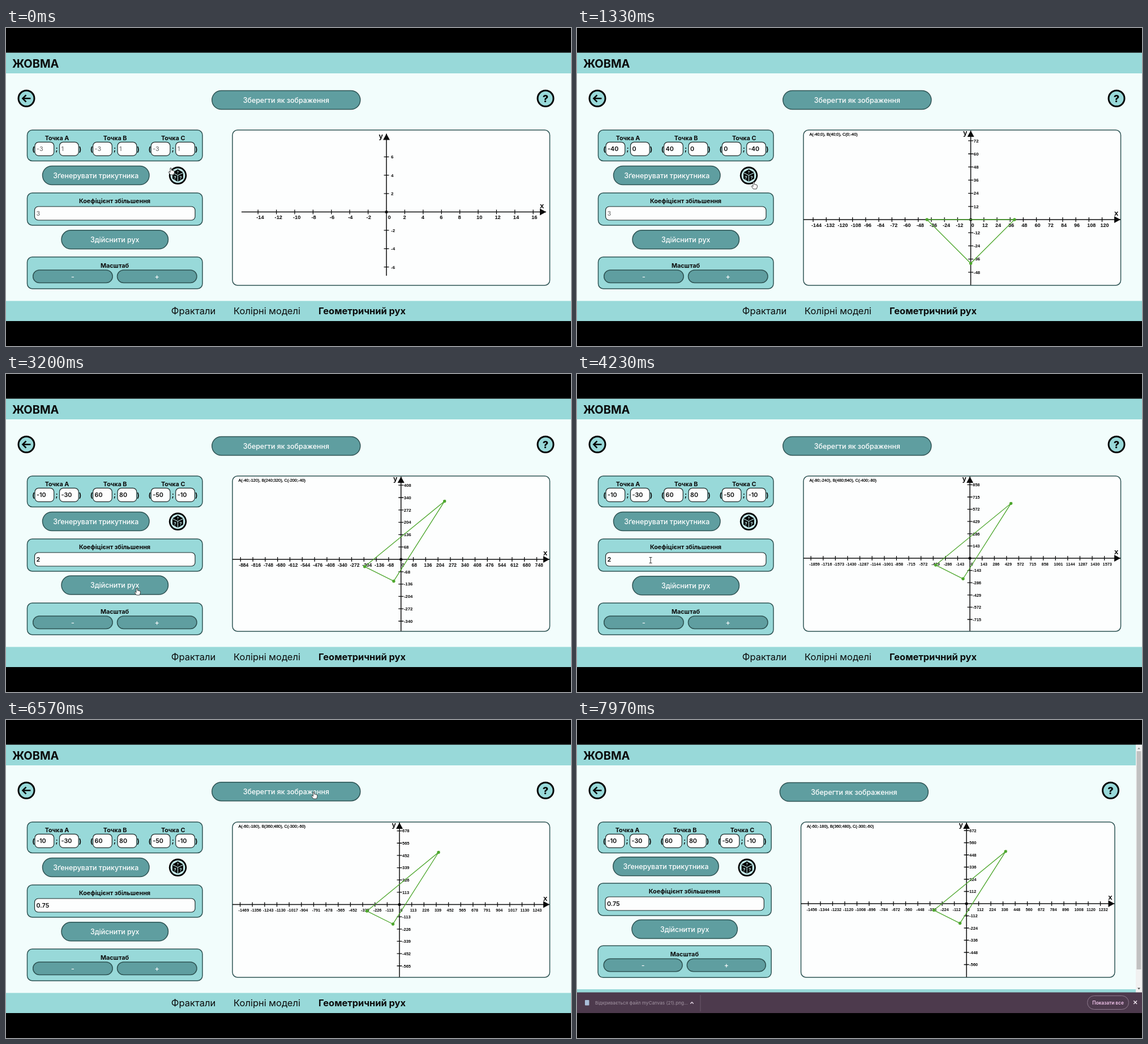
Animation of 998x561 px, one loop 8 s. Source, as an HTML page with a canvas:

```html
<!DOCTYPE html>
<html lang="uk">
<head>
<meta charset="utf-8">
<title>Геометричний рух</title>
<style>
html, body { margin: 0; width: 100%; height: 100%; overflow: hidden; background: #000; }
canvas { display: block; }
</style>
</head>
<body>
<canvas id="stage" width="998" height="561"></canvas>
<script>
const ctx = document.getElementById('stage').getContext('2d');
const LOOP = 8000, BAR_AT = 6680;
const TEAL = '#98d9d9', BUTTON = '#5f9ea0', EDGE = '#2f5454', INK = '#0b0b0b', GREEN = '#4ea72e';
const UI = 'Inter, "Open Sans", sans-serif';
const PLOT = '"Liberation Sans", Arial, sans-serif';

// Plot states: start time, origin, label step, pixels per step, points, label sizes
const first = [-40, 0, 40, 0, 0, -40];
const second = [-10, -30, 60, 80, -50, -10];
const times = k => second.map(v => v * k);
const plots = [
  { t: 0, o: [672, 324.5], step: 2, px: 32.4, size: 9.3, ySize: 8 },
  { t: 500, o: [695.5, 338], step: 12, px: 23.2, pts: first, base: first, size: 9, ySize: 8 },
  { t: 1640, o: [699.5, 328.5], step: 16, px: 21.85, pts: second, base: second, size: 9, ySize: 8 },
  { t: 2920, o: [698.5, 327.5], step: 34, px: 21.8, pts: times(2), base: second, size: 8.8, ySize: 8 },
  { t: 3120, o: [697.7, 327], step: 68, px: 21.8, pts: times(4), base: second, size: 8.5, ySize: 7.8 },
  { t: 3480, o: [694, 325], step: 143, px: 21.6, pts: times(8), base: second, size: 7.3, ySize: 7.5 },
  { t: 5240, o: [694, 325], step: 143, px: 21.6, pts: times(6), base: second, size: 7.3, ySize: 7.5 },
  { t: 5860, o: [695, 325.5], step: 113, px: 21.65, pts: times(6), base: second, size: 7.3, ySize: 7.5 },
  { t: BAR_AT, o: [688, 324], step: 112, px: 21.5, pts: times(6), base: second, size: 7.3, ySize: 7.5 }
];

const typing = [[0, ''], [2680, '2'], [4260, ''], [4420, '0'], [4540, '0.'], [4680, '0.7'], [4800, '0.75']];

// Pointer tip: time, x, y
const path = [
  [0, 291, 247], [250, 304, 261], [900, 306, 264], [1250, 312, 272], [1660, 312, 272], [2200, 199, 333],
  [2560, 199, 333], [2850, 228, 376], [3200, 231, 378], [3560, 231, 378], [4050, 130, 328],
  [4850, 130, 328], [5180, 205, 372], [5380, 205, 372], [5720, 266, 437], [5940, 266, 437],
  [6400, 543.5, 127], [6760, 543.5, 127], [7250, 640, 150], [7780, 690, 26], [8000, 690, 26]
];

const latest = (list, t, at) => list.filter(e => at(e) <= t).pop();

function pointerAt(t) {
  let i = 1;
  while (i < path.length - 1 && path[i][0] < t) i++;
  const [a, b] = [path[i - 1], path[i]];
  const u = Math.min(1, Math.max(0, (t - a[0]) / (b[0] - a[0])));
  const k = u * u * (3 - 2 * u);
  return { x: a[1] + (b[1] - a[1]) * k, y: a[2] + (b[2] - a[2]) * k };
}

function text(s, x, y, font, color = INK, align = 'center') {
  ctx.font = font;
  ctx.fillStyle = color;
  ctx.textAlign = align;
  ctx.textBaseline = 'alphabetic';
  ctx.fillText(s, x, y);
}

function box(x, y, w, h, r, fill, stroke, line = 1.5) {
  ctx.beginPath();
  ctx.roundRect(x, y, w, h, r);
  ctx.fillStyle = fill;
  ctx.fill();
  if (!stroke) return;
  ctx.strokeStyle = stroke;
  ctx.lineWidth = line;
  ctx.stroke();
}

function disc(x, y, r, fill, stroke, line) {
  ctx.beginPath();
  ctx.arc(x, y, r, 0, 7);
  ctx.fillStyle = fill;
  ctx.fill();
  if (!stroke) return;
  ctx.strokeStyle = stroke;
  ctx.lineWidth = line;
  ctx.stroke();
}

function poly(points, close) {
  ctx.beginPath();
  for (let i = 0; i < points.length; i += 2) ctx.lineTo(points[i], points[i + 1]);
  if (close) ctx.closePath();
}

function strokePoly(points, color, width, close) {
  poly(points, close);
  ctx.strokeStyle = color;
  ctx.lineWidth = width;
  ctx.stroke();
}

function fillPoly(points, color) {
  poly(points, true);
  ctx.fillStyle = color;
  ctx.fill();
}

const inside = (p, x, y, w, h) => p.x >= x && p.x <= x + w && p.y >= y && p.y <= y + h;

function button(p, label, x, y, w, h = 33) {
  const over = inside(p, x, y, w, h);
  if (over) p.kind = 'hand';
  const top = over && h > 30 ? y - 0.8 : y;
  box(x, top, w, h, h / 2, BUTTON, EDGE);
  text(label, x + w / 2, top + h / 2 + 4.5, `500 12.4px ${UI}`, '#fff');
}

function field(p, x, y, w, value, hint) {
  if (inside(p, x, y, w, 24)) p.kind = 'beam';
  box(x, y, w, 24, 6.5, '#fdfefe', '#1d2b2b', 1.2);
  text(value || hint, x + 3, y + 16, `${value ? 600 : 500} 10.8px ${UI}`, value ? INK : '#777', 'left');
}

function die(x, y) {
  disc(x, y, 15.7, '#050505');
  disc(x, y, 12.9, '#c5eeee');
  const ring = [];
  for (let i = 0; i < 6; i++) {
    const a = Math.PI * (i / 3 + 1 / 6);
    ring.push(x + 11 * Math.cos(a), y + 11 * Math.sin(a));
  }
  fillPoly(ring, '#050505');
  const light = '#c5eeee';
  strokePoly([x - 9.5, y - 5, x, y - 0.3, x + 9.5, y - 5], light, 1.1);
  strokePoly([x, y, x, y + 11], light, 1.1);
  text('?', x - 5, y + 6.5, `700 8px ${UI}`, light);
  text('?', x + 5, y + 6.5, `700 8px ${UI}`, light);
  text('?', x, y - 3.5, `700 6px ${UI}`, light);
}

function plot(g, s, bare) {
  const [ox, oy] = g.o;
  const left = bare ? 416 : 400 * s, right = bare ? 954 : 960 * s;
  const top = bare ? 186.5 : 181, bottom = bare ? 437 : 453.5;
  strokePoly([left, oy, right, oy], INK, 1.5);
  strokePoly([ox, top, ox, bottom], INK, 1.5);
  fillPoly([right, oy, right - 11, oy - 6, right - 11, oy + 6], INK);
  fillPoly([ox, top, ox - 6, top + 11, ox + 6, top + 11], INK);
  text('x', right - 7.5, oy - 7, `bold 13px ${PLOT}`);
  text('y', ox - 10, top + 8, `bold 13px ${PLOT}`);
  text('0', ox + (bare ? 5 : 3.5), oy + 12.5, `bold ${g.size}px ${PLOT}`);

  for (let i = -Math.floor((ox - left - 5) / g.px); i <= Math.floor((right - 15 - ox) / g.px); i++) {
    if (!i) continue;
    const x = ox + i * g.px;
    strokePoly([x, oy - 4, x, oy + 4], INK, 1.3);
    text(i * g.step, x - 3, oy + 12.7, `bold ${g.size}px ${PLOT}`, INK, 'left');
  }
  for (let i = -Math.floor((bottom - 5 - oy) / g.px); i <= Math.floor((oy - top - 10) / g.px); i++) {
    if (!i) continue;
    const y = oy - i * g.px;
    strokePoly([ox - 4.5, y, ox + 4.5, y], INK, 1.3);
    text(i * g.step, ox + (bare ? 8 : 5), y + 2.8, `bold ${g.ySize}px ${PLOT}`, INK, 'left');
  }
  disc(ox, oy, 2.6, INK);
  if (!g.pts) return;

  const v = g.pts;
  const caption = `A(${v[0]};${v[1]}), B(${v[2]};${v[3]}), C(${v[4]};${v[5]})`;
  for (let i = 0; i < 2; i++) text(caption, 410.5 * s, 190.3, `7.3px ${PLOT}`, INK, 'left');
  const k = g.px / g.step;
  const pts = v.map((c, i) => i % 2 ? oy - c * k : ox + c * k);
  strokePoly(pts, GREEN, 1.35, true);
  for (let i = 0; i < 6; i += 2) disc(pts[i], pts[i + 1], 2.7, GREEN);
}

function page(t, p) {
  const bar = t >= BAR_AT, s = bar ? 987 / 998 : 1;
  const lift = n => bar ? -n : 0;
  const g = latest(plots, t, e => e.t);
  ctx.fillStyle = '#f2fdfc';
  ctx.fillRect(0, 43.5, 998, 473.5);
  ctx.fillStyle = TEAL;
  ctx.fillRect(0, 43.5, 998, 36.5);
  ctx.fillRect(0, 481.5 + lift(6.5), 998, 36);
  text('ЖОВМА', 11, 70, `700 20px ${UI}`, INK, 'left');

  disc(36, 124.3, 14, TEAL, '#050505', 3);
  strokePoly([43.5, 124.3, 30, 124.3], '#050505', 2.6);
  strokePoly([35.5, 118.3, 29.5, 124.3, 35.5, 130.3], '#050505', 2.6);
  disc(953 * s, 124.3, 14, TEAL, '#050505', 3);
  text('?', 953 * s, 131, `800 18px ${UI}`, '#050505');
  button(p, 'Зберегти як зображення', 494.8 * s - 131, 110.5, 262);

  const panel = (y, h) => box(37.5 * s, y, 309.5 * s, h, 9, TEAL, EDGE);
  const label = `700 10.8px ${UI}`;
  panel(180, 54.5);
  const hints = [-3, 1];
  ['A', 'B', 'C'].forEach((name, i) => {
    const x = (90 + i * 102.6) * s;
    text('Точка ' + name, x, 198, label);
    text('(', x - 41.5 * s, 217.5, `700 12px ${UI}`);
    text(';', x - 0.5, 217, `700 12px ${UI}`);
    text(')', x + 41 * s, 217.5, `700 12px ${UI}`);
    for (let j = 0; j < 2; j++) {
      field(p, x + (j ? 4.5 : -39) * s, 201.3, 33.7 * s, g.base ? String(g.base[i * 2 + j]) : '', hints[j]);
    }
  });

  button(p, 'Зґенерувати трикутника', 64.5 * s, 243.5 + lift(1.7), 188.5 * s);
  const dx = 303.5 * s;
  if (Math.hypot(p.x - dx, p.y - 260) < 18.5) p.kind = 'hand';
  die(dx, 260.3);

  panel(291 + lift(3), 57);
  text('Коефіцієнт збільшення', 192 * s, 309 + lift(3), label);
  field(p, 50.5 * s, 315 + lift(3), 283.5 * s, latest(typing, t, e => e[0])[1], '3');
  button(p, 'Здійснити рух', 98 * s, 356.8 + lift(4.3), 188.5 * s);

  panel(404 + lift(5.7), 56);
  text('Масштаб', 192 * s, 422.7 + lift(5.7), label);
  button(p, '-', 47.7 * s, 427 + lift(5.7), 140.5 * s, 22.5);
  button(p, '+', 196.5 * s, 427 + lift(5.7), 140.5 * s, 22.5);

  box(400 * s, 180, 560.5 * s, 274, 9, '#fdfefe', EDGE);
  plot(g, s, !g.pts);

  if (bar) return downloads();
  text('Фрактали', 331, 505, `400 16.5px ${UI}`);
  text('Колірні моделі', 461, 505, `400 16.5px ${UI}`);
  text('Геометричний рух', 629, 505, `700 16.4px ${UI}`);
}

function downloads() {
  ctx.fillStyle = '#f1f1f1';
  ctx.fillRect(987, 43.5, 11, 437.5);
  ctx.fillStyle = '#c1c1c1';
  ctx.fillRect(988.5, 55, 8, 385);
  fillPoly([990, 51.5, 995, 51.5, 992.5, 48.5], '#8c8c8c');
  fillPoly([990, 472.5, 995, 472.5, 992.5, 475.5], '#505050');

  ctx.fillStyle = '#4d3a4d';
  ctx.fillRect(0, 480.5, 998, 36.5);
  box(14, 494, 7.5, 9.5, 1, '#a9bdd8');
  text('Відкривається файл myCanvas (21).png...', 32, 502, `400 8.2px ${UI}`, '#a294a2', 'left');
  strokePoly([200.3, 500.5, 203, 497.8, 205.7, 500.5], '#e6d8e6', 1.4);
  strokePoly([218, 485, 218, 514], '#6b586b', 1);
  box(901.5, 486.5, 73, 24, 12, '#4d3a4d', '#8d798d', 1);
  text('Показати все', 938, 501.7, `600 8.3px ${UI}`, '#f4c6ee');
  strokePoly([983.3, 495.3, 989, 501], '#f0e6f0', 1.4);
  strokePoly([989, 495.3, 983.3, 501], '#f0e6f0', 1.4);
}

function pointer(p) {
  ctx.save();
  ctx.translate(p.x, p.y);
  if (p.kind === 'beam') {
    strokePoly([-2.5, -4.5, 2.5, -4.5], '#333', 1);
    strokePoly([0, -4.5, 0, 5.5], '#333', 1);
    strokePoly([-2.5, 5.5, 2.5, 5.5], '#333', 1);
  } else {
    const shape = p.kind === 'hand'
      ? [-1, 0, 1, 0, 1.3, 4, 4, 4.3, 6, 5, 6.5, 8, 5, 12, -0.5, 12, -4, 7.3, -3, 6.3, -1, 7.5]
      : [0, 0, 0, 11, 2.5, 8.7, 4.2, 12.5, 6, 11.7, 4.4, 8, 7.7, 8];
    fillPoly(shape, '#fff');
    strokePoly(shape, '#333', 0.9, true);
  }
  ctx.restore();
}

const start = performance.now();
function frame(now) {
  const t = Math.max(0, now - start) % LOOP;
  const p = pointerAt(t);
  p.kind = 'arrow';
  ctx.fillStyle = '#000';
  ctx.fillRect(0, 0, 998, 561);
  ctx.save();
  ctx.beginPath();
  ctx.rect(0, 43.5, 998, 473.5);
  ctx.clip();
  page(t, p);
  pointer(p);
  ctx.restore();
  requestAnimationFrame(frame);
}
frame(start);
</script>
</body>
</html>
```
